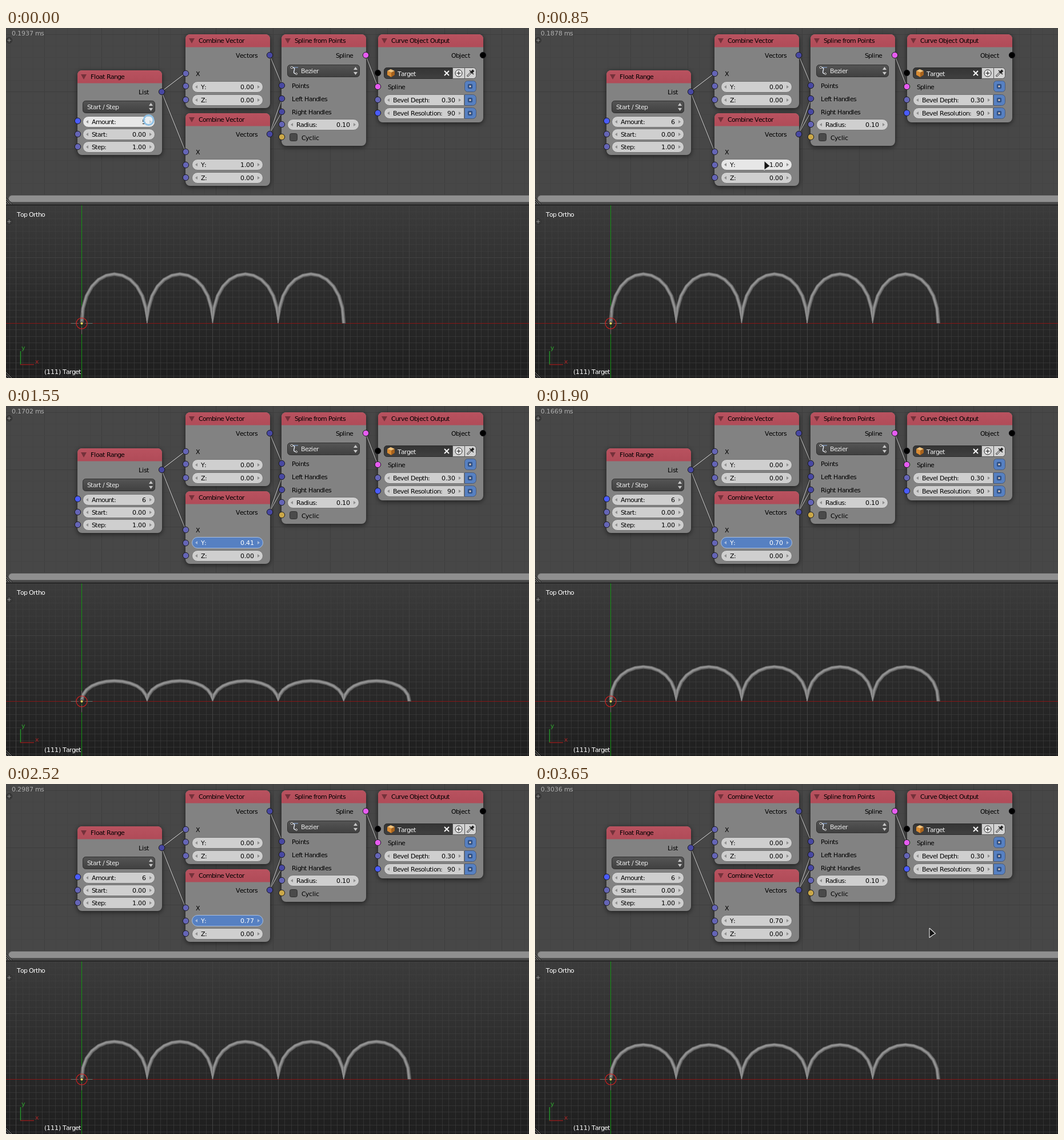
An HTML page with a canvas that plays this animation: 915 px wide and 612 px high, repeating every 3690 ms.

```html
<!DOCTYPE html>
<html lang="en">
<head>
<meta charset="utf-8">
<title>Spline nodes</title>
<style>
html, body { margin: 0; width: 100%; height: 100%; overflow: hidden; background: #474747; }
canvas { display: block; }
</style>
</head>
<body>
<canvas id="stage" width="915" height="612"></canvas>
<script>
const W = 915, H = 612, LOOP = 3690, TAU = Math.PI * 2;
const ctx = document.getElementById('stage').getContext('2d');
const FAMILY = '"DejaVu Sans", Verdana, sans-serif';

// Bursts of motion as [start, end]; the picture rests between them.
const BURSTS = [[320, 810], [850, 1260], [1470, 1590], [1730, 2150], [2350, 2560], [2750, 3070]];
const HEIGHT = [[890, 1], [930, .97], [1010, .82], [1090, .63], [1170, .46], [1260, .38], [1470, .38],
  [1590, .43], [1730, .46], [1890, .7], [2010, .88], [2150, .98], [2350, 1], [2430, .87], [2560, .7]];
const POINTER_X = [[320, 250], [810, 398], [850, 400], [890, 401], [2750, 384], [2790, 398],
  [2830, 425], [2870, 470], [2910, 525], [2990, 630], [3070, 691]];
const POINTER_Y = [[320, 160], [810, 229], [850, 231], [2750, 233], [2830, 248], [2870, 254], [2910, 251]];
const TIMINGS = [[0, '0.1937'], [320, '0.1842'], [480, '0.1878'], [930, '0.1925'], [1010, '0.2054'],
  [1090, '0.1718'], [1170, '0.1673'], [1260, '0.1691'], [1470, '0.1702'], [1590, '0.1684'],
  [1730, '0.1712'], [1890, '0.1669'], [2010, '0.1731'], [2150, '0.1806'], [2350, '0.3009'],
  [2430, '0.2987'], [2560, '0.3036']];

function snap(t) {
  for (const [start, end] of BURSTS.slice().reverse())
    if (t >= start) return Math.min(end, start + Math.floor((t - start) / 40) * 40);
  return 0;
}

function tween(keys, t) {
  if (t <= keys[0][0]) return keys[0][1];
  for (let i = 1; i < keys.length; i++) {
    const [t0, a] = keys[i - 1], [t1, b] = keys[i];
    if (t <= t1) return a + (b - a) * (t - t0) / (t1 - t0);
  }
  return keys[keys.length - 1][1];
}

const latest = (keys, t) => keys.filter(k => k[0] <= t).pop()[1];

// Glyph advances are whole pixels, rounded down.
const advances = {};
function advance(ch) {
  if (!(ch in advances)) {
    ctx.font = '1100px ' + FAMILY;
    advances[ch] = Math.floor(ctx.measureText(ch).width / 100 + .004);
  }
  return advances[ch];
}

function text(str, x, cy, color = '#000', right = false) {
  const chars = [...str];
  const steps = chars.map(advance);
  if (right) x -= steps.reduce((a, b) => a + b, 0);
  ctx.font = '11px ' + FAMILY;
  ctx.fillStyle = color;
  chars.forEach((ch, i) => { ctx.fillText(ch, x, cy + 4); x += steps[i]; });
}

function rect(x, y, w, h, color) {
  ctx.fillStyle = color;
  ctx.fillRect(x, y, w, h);
}

function line(color, width, ...pts) {
  ctx.beginPath();
  for (let i = 0; i < pts.length; i += 2) ctx.lineTo(pts[i], pts[i + 1]);
  ctx.strokeStyle = color;
  ctx.lineWidth = width;
  ctx.stroke();
}

function poly(color, ...pts) {
  ctx.beginPath();
  for (let i = 0; i < pts.length; i += 2) ctx.lineTo(pts[i], pts[i + 1]);
  ctx.closePath();
  ctx.fillStyle = color;
  ctx.fill();
}

function box(x, y, w, h, r, fill, stroke) {
  ctx.beginPath();
  ctx.roundRect(x + .5, y + .5, w - 1, h - 1, r);
  ctx.fillStyle = fill;
  ctx.fill();
  if (stroke) {
    ctx.strokeStyle = stroke;
    ctx.lineWidth = 1;
    ctx.stroke();
  }
}

function disc(x, y, r, fill, stroke, width = 1) {
  ctx.beginPath();
  ctx.arc(x, y, r, 0, TAU);
  if (fill) { ctx.fillStyle = fill; ctx.fill(); }
  if (stroke) { ctx.strokeStyle = stroke; ctx.lineWidth = width; ctx.stroke(); }
}

function shade(y, h, top, bottom) {
  const g = ctx.createLinearGradient(0, y, 0, y + h);
  g.addColorStop(0, top);
  g.addColorStop(1, bottom);
  return g;
}

function node(title, x, y, w, h) {
  ctx.save();
  ctx.shadowColor = 'rgba(0,0,0,.6)';
  ctx.shadowBlur = 9;
  ctx.shadowOffsetY = 2;
  box(x - .5, y - .5, w + 1, h + 1, 8, '#828282');
  ctx.restore();
  box(x - .5, y - .5, w + 1, 23.5, [8, 8, 0, 0], shade(y, 23, '#b9525f', '#b04b58'));
  poly('#74313a', x + 6, y + 7, x + 16, y + 7, x + 11, y + 16);
  text(title, x + 23, y + 11);
}

function field(label, value, x, cy, w, state = '', corners = 9.5) {
  const active = state === 'active';
  const y = cy - 10;
  const fill = active ? '#5680c2' : state === 'hover' ? '#e7e7e7' : '#cfcfcf';
  box(x, y, w, 20, corners, fill, active ? '#a9bfdf' : '#747474');
  const arrow = active ? '#a9bcdb' : '#8d8d8d';
  poly(arrow, x + 6, cy, x + 10, cy - 3, x + 10, cy + 3);
  poly(arrow, x + w - 6, cy, x + w - 10, cy - 3, x + w - 10, cy + 3);
  const ink = active ? '#fff' : '#000';
  text(label, x + 16, cy, ink);
  text(value, x + w - 16, cy, ink, true);
}

function dropdown(label, x, cy, indent) {
  box(x, cy - 11, 127, 22, 5, shade(cy - 11, 22, '#555', '#404040'), '#303030');
  text(label, x + indent, cy, '#e8e8e8');
  poly('#c9c9c9', x + 116, cy - 2, x + 123, cy - 2, x + 119.5, cy - 7);
  poly('#c9c9c9', x + 116, cy + 2, x + 123, cy + 2, x + 119.5, cy + 7);
}

function toggle(y, corners) {
  box(802, y, 21, 20, corners, '#5680c2', '#4b5a75');
  box(808, y + 6, 8, 8, 1, '#35578f', '#2c466f');
  disc(812, y + 10, 1.6, '#f2d4b5');
}

const FLOAT = '#6565b6', LIST = '#4848a2', INT = '#4a5cff', CURVE = '#e65cf0', BLACK = '#000';
function sockets(color, x, ...ys) {
  ys.forEach(y => disc(x + .5, y + .5, 5.2, color, '#17171c'));
}

function link(...pts) {
  line('rgba(0,0,0,.3)', 2.6, ...pts);
  line('#bcbcbc', 1.2, ...pts);
}

function plus(y) {
  disc(5.5, y, 5, '#3c3c3c', '#2e2e2e');
  line('#8a8a8a', 1, 2.5, y, 8.5, y);
  line('#8a8a8a', 1, 5.5, y - 3, 5.5, y + 3);
}

function corner(y) {
  for (const d of [3, 7, 11]) {
    line('#111', 1, 0, y - d, d, y);
    line('#888', 1, 0, y - d + 1, d - 1, y);
  }
}

function grid(x0, x1, y0, y1, ox, oy, step, major, thin, thick) {
  const each = (lo, hi, o, draw) => {
    for (let k = Math.ceil((lo - o) / step); o + k * step < hi; k++)
      draw(Math.floor(o + k * step), k % major ? thin : thick);
  };
  each(x0, x1, ox, (x, c) => rect(x, y0, 1, y1 - y0, c));
  each(y0, y1, oy, (y, c) => rect(x0, y, x1 - x0, 1, c));
}

function drawNodes(s, pointer) {
  const hover = (x, cy, w) => pointer && pointer.x > x && pointer.x < x + w &&
    Math.abs(pointer.y - cy) < 10 ? 'hover' : '';
  const dragging = s >= 890 && s < 2750;

  rect(0, 0, W, 310, '#474747');
  grid(0, W, 0, 292, 67, 11, 20, 5, '#444', '#3e3e3e');

  link(272, 111, 314, 79);
  link(272, 111, 314, 216);
  link(461, 47, 483, 100);
  link(461, 185, 483, 123);
  link(461, 185, 483, 146);
  link(629, 47, 650, 102);

  node('Float Range', 125, 74, 148, 148);
  text('List', 250, 112, '#000', true);
  dropdown('Start / Step', 134, 138, 8);
  field('Amount:', s < 320 ? '5' : '6', 134, 164, 127, s < 320 ? 'hover' : hover(134, 164, 127));
  field('Start:', '0.00', 134, 186, 127, hover(134, 186, 127));
  field('Step:', '1.00', 134, 208, 127, hover(134, 208, 127));
  sockets(LIST, 272, 111);
  sockets(INT, 125, 162);
  sockets(FLOAT, 125, 185, 207);

  node('Combine Vector', 314, 11, 148, 129);
  text('Vectors', 440, 48, '#000', true);
  text('X', 332, 80);
  field('Y:', '0.00', 325, 103, 125);
  field('Z:', '0.00', 325, 126, 125);
  sockets(LIST, 461, 47);
  sockets(FLOAT, 314, 79, 101, 125);

  node('Combine Vector', 314, 149, 148, 127);
  text('Vectors', 440, 186, '#000', true);
  text('X', 332, 217);
  field('Y:', tween(HEIGHT, s).toFixed(2), 325, 239, 125, dragging ? 'active' : hover(325, 239, 125));
  field('Z:', '0.00', 325, 262, 125, hover(325, 262, 125));
  sockets(LIST, 461, 185);
  sockets(FLOAT, 314, 216, 239, 261);

  node('Spline from Points', 482, 11, 148, 195);
  text('Spline', 607, 48, '#000', true);
  dropdown('Bezier', 492, 75, 24);
  ctx.beginPath();
  ctx.moveTo(500, 69);
  ctx.bezierCurveTo(512, 69, 496, 80, 509, 80);
  ctx.strokeStyle = '#e4e9f2';
  ctx.lineWidth = 1.5;
  ctx.stroke();
  line('#8fb3e8', 1, 503, 69, 511, 69);
  disc(500, 69, 1.8, '#1c1c1c', '#ddd');
  disc(508, 80, 1.5, '#1c1c1c', '#ddd');
  text('Points', 500, 101);
  text('Left Handles', 500, 124);
  text('Right Handles', 500, 147);
  field('Radius:', '0.10', 492, 169, 126);
  box(496, 184, 14, 14, 3, '#4a4a4a', '#2e2e2e');
  text('Cyclic', 517, 192);
  sockets(CURVE, 629, 47);
  sockets(LIST, 482, 100, 123, 146);
  sockets(FLOAT, 482, 168);
  sockets('#cba848', 482, 190);

  node('Curve Object Output', 651, 11, 184, 154);
  text('Object', 812, 48, '#000', true);
  box(661, 69, 121, 20, [5, 0, 0, 5], shade(69, 20, '#343434', '#404040'), '#2a2a2a');
  box(781, 69, 22, 20, 0, '#d2d2d2', '#555');
  box(802, 69, 21, 20, [0, 5, 5, 0], '#d2d2d2', '#555');
  poly('#f0c27c', 667, 75, 673, 72, 680, 75, 674, 78);
  poly('#d98b33', 667, 75, 674, 78, 674, 86, 667, 82);
  poly('#a8631d', 674, 78, 680, 75, 680, 82, 674, 86);
  text('Target', 685, 80, '#f0f0f0');
  line('#fff', 1.8, 767, 75, 775, 83);
  line('#fff', 1.8, 775, 75, 767, 83);
  disc(792, 79, 6, '#eee', '#222');
  line('#222', 1.2, 788.5, 79, 795.5, 79);
  line('#222', 1.2, 792, 75.5, 792, 82.5);
  line('#222', 3, 807, 84.5, 814, 77.5);
  line('#eee', 1.2, 807.5, 84, 813, 78.5);
  line('#222', 4, 814, 78, 818, 74);
  line('#222', 1.5, 811, 74, 818, 81);
  text('Spline', 668, 103);
  toggle(92, 5);
  field('Bevel Depth:', '0.30', 661, 126, 141, '', [9.5, 0, 0, 9.5]);
  toggle(116, [0, 6, 6, 0]);
  field('Bevel Resolution:', '90', 661, 149, 141, '', [9.5, 0, 0, 9.5]);
  toggle(139, [0, 6, 6, 0]);
  sockets(BLACK, 834, 47);
  sockets(BLACK, 650, 78);
  sockets(CURVE, 650, 102);
  sockets(FLOAT, 650, 125);
  sockets(INT, 650, 148);

  text(latest(TIMINGS, s) + ' ms', 10, 9, '#b0b0b0');
  plus(21.5);
  box(4, 292, W + 20, 13, 6, '#8f8f8f', '#5a5a5a');
  corner(308);
  rect(0, 309, W, 1, '#0c0c0c');
}

const ORIGIN_X = 132.5, ORIGIN_Y = 516.5, UNIT = 114.65;

// One span of the tube; it pinches to nothing where two spans meet.
function ribbon(i, count, height, half, shift, color) {
  const outer = [], inner = [], N = 12;
  for (let k = 0; k <= N; k++) {
    const t = k / N;
    const x = ORIGIN_X + UNIT * (i + t * t * (3 - 2 * t)) + shift;
    const y = ORIGIN_Y - UNIT * height * 3 * t * (1 - t) + shift;
    const dx = 6 * t * (1 - t), dy = -3 * height * (1 - 2 * t);
    const len = Math.hypot(dx, dy) || 1;
    const pinched = (k === 0 && i > 0) || (k === N && i < count - 1);
    const r = pinched ? .4 : half;
    outer.push(x + dy / len * r, y - dx / len * r);
    inner.unshift(x - dy / len * r, y + dx / len * r);
  }
  poly(color, ...outer, ...inner);
}

function drawViewport(s) {
  rect(0, 310, W, 302, shade(310, 302, '#3b3b3b', '#1e1e1e'));
  grid(0, W, 310, H, ORIGIN_X, ORIGIN_Y, UNIT / 10, 10, 'rgba(66,66,66,.55)', '#424242');
  rect(0, 516, W, 1, '#861616');
  rect(132, 310, 1, 302, '#129412');

  const count = s < 320 ? 4 : 5, height = tween(HEIGHT, s);
  const layers = [[3.4, 0, '#555'], [2.6, -.3, '#747474'], [1.3, -.5, '#949494']];
  for (const [half, shift, color] of layers)
    for (let i = 0; i < count; i++) ribbon(i, count, height, half, shift, color);

  for (const [dx, dy] of [[1, 0], [-1, 0], [0, 1], [0, -1]])
    line('#76706a', 1, 132.5 + dx * 6, 516.5 + dy * 6, 132.5 + dx * 19, 516.5 + dy * 19);
  disc(132.5, 516.5, 9.5, null, '#d02020', 1.2);
  disc(132.5, 516.5, 2.6, '#ffd868', '#151515');

  line('#23952a', 1.5, 25.5, 589, 25.5, 565);
  line('#8f1c1c', 1.5, 25, 588.5, 49, 588.5);
  text('y', 27, 559, '#2da52d');
  text('x', 51, 583, '#a52222');
  text('Top Ortho', 19, 326, '#fff');
  text('(111) Target', 67, 601, '#fff');
  plus(338.5);
  corner(612);
}

function pointerAt(t, s) {
  if (s < 320 || (s >= 890 && s < 2750)) return null;
  const drift = t >= 3650 ? -2 : t >= 3260 ? -1 : 0;
  return { x: Math.round(tween(POINTER_X, s)) + drift, y: Math.round(tween(POINTER_Y, s)) };
}

function drawPointer({ x, y }) {
  const shape = [x + 1, y + 1, x + 11.5, y + 10.5, x + 7, y + 13, x + 1, y + 17.5];
  ctx.lineJoin = 'round';
  poly('#141414', ...shape);
  line('#e4e4e4', 1.1, ...shape, x + 1, y + 1);
  ctx.lineJoin = 'miter';
}

function pressRing(x, y, age) {
  if (age < 0 || age >= 120) return;
  const step = Math.floor(age / 40);
  disc(x, y, 8.5 + step, `rgba(235,245,252,${.6 - step * .25})`, '#8fc1e6', 3 - step * .8);
}

function releaseRing(x, y, age) {
  if (age < 0 || age >= 200) return;
  disc(x, y, 6.5 + Math.floor(age / 40), null, '#8fc1e6', 1.8);
}

function frame() {
  const t = performance.now() % LOOP, s = snap(t), pointer = pointerAt(t, s);
  drawNodes(s, pointer);
  drawViewport(s);
  pressRing(249.5, 161, t);
  releaseRing(249.5, 161, t - 320);
  pressRing(401, 232, t - 890);
  releaseRing(384.5, 237, t - 2750);
  if (pointer) drawPointer(pointer);
  requestAnimationFrame(frame);
}
frame();
</script>
</body>
</html>
```
